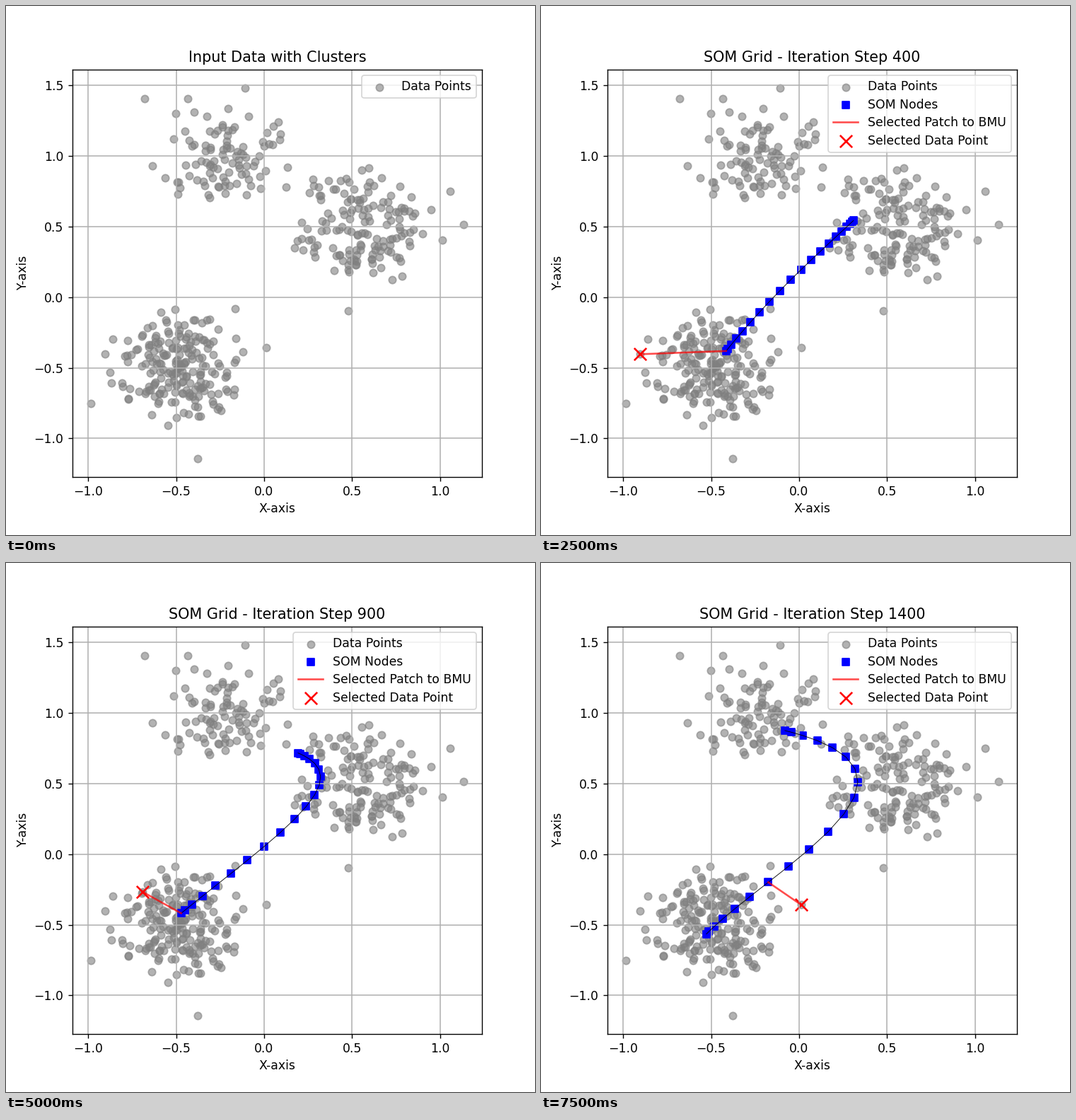
A matplotlib script that plays this animation: 748 by 748 pixels, repeating every 8000 ms.

```python
import numpy as np
import matplotlib.pyplot as plt
from matplotlib.animation import FuncAnimation

NODES = 20


def to_data(points):
    """Convert stage pixels (y down) to axis coordinates."""
    return (np.asarray(points, float) - (365, 411.8)) / (249, -199.7)


# Sample picked at each training step
PICKS = to_data([
    (288, 443.5), (267, 542.5), (320, 175), (269, 490.5), (139.5, 492.5),
    (563, 290), (335, 199), (272, 552), (300, 505), (193, 465),
    (288, 535.5), (216.5, 548.5), (232, 517), (229, 593), (368, 483.5)])

OUTLIERS = to_data([
    (196, 131), (257, 131), (338, 116), (385, 164), (628, 262),
    (647, 309), (484, 431), (324, 428), (120, 562), (271, 640)])

# Four key nodes of the chain at some steps
KEYS = np.array([2, 7, 12, 17])
CHAINS = {
    200: [(288, 463), (322, 406), (358, 331), (379, 275)],
    400: [(269, 479), (323, 418), (395, 347), (437, 308)],
    700: [(258, 494), (330, 433), (406, 336), (405, 281)],
    900: [(263, 483), (365, 401), (443, 314), (422, 273)],
    1200: [(242, 515), (347, 431), (443, 318), (378, 257)],
    1400: [(245, 514), (350, 429), (448, 310), (370, 244)],
}

rng = np.random.default_rng(7)


def cluster(n, center, spread, reach=2.3):
    """Normal cloud cut off at `reach` deviations."""
    u = rng.random(n) * (1 - np.exp(-reach ** 2 / 2))
    r, a = np.sqrt(-2 * np.log(1 - u)), rng.random(n) * 2 * np.pi
    offset = np.column_stack([r * np.cos(a), r * np.sin(a)])
    return to_data(center + offset * spread)


data = np.vstack([
    OUTLIERS, PICKS,
    cluster(188, (240, 510), (44, 38)),
    cluster(146, (503, 311), (51, 40)),
    cluster(92, (311, 214), (49, 37))])


def waves(nodes):
    """Cosines that flatten at both ends, as a trained chain does."""
    return np.cos(np.outer(nodes + 0.5, np.arange(len(KEYS))) * np.pi / NODES)


def full_chain(points):
    return waves(np.arange(NODES)) @ np.linalg.solve(waves(KEYS), to_data(points))


chains = [full_chain(p) for p in CHAINS.values()]

# Training starts from a random tangle that first shrinks to a short chain
tangle = rng.random((NODES, 2))
tangle *= 0.867 / tangle[:, 0].max()
short = chains[0].mean(axis=0) + 0.6 * (chains[0] - chains[0].mean(axis=0))
steps = [0, 100, *CHAINS]
shapes = np.array([tangle, short, *chains])


def nodes_at(step):
    k = min(np.searchsorted(steps, step, side="right"), len(steps) - 1)
    f = (step - steps[k - 1]) / (steps[k] - steps[k - 1])
    return (1 - f) * shapes[k - 1] + f * shapes[k]


fig, ax = plt.subplots(figsize=(6, 6), dpi=748 / 6)


def draw_training(step, pick):
    nodes = nodes_at(step)
    best = nodes[np.argmin(((nodes - pick) ** 2).sum(axis=1))]
    ax.scatter(*nodes.T, color="blue", marker="s", label="SOM Nodes")
    ax.plot(*nodes.T, color="black", lw=0.5)
    ax.plot(*zip(pick, best), color="red", alpha=0.7,
            label="Selected Patch to BMU")
    ax.scatter(*pick, color="red", marker="x", s=100,
               label="Selected Data Point")
    ax.set_title(f"SOM Grid - Iteration Step {step}")


def draw(i):
    ax.clear()
    ax.scatter(*data.T, color="gray", alpha=0.6, label="Data Points")
    if i == 0:
        ax.set_title("Input Data with Clusters")
    else:
        draw_training((i - 1) * 100, PICKS[i - 1])
    ax.set(xlim=(-1.0904, 1.2378), ylim=(-1.272, 1.612))
    ax.set_xlabel("X-axis", labelpad=3.3)
    ax.set_ylabel("Y-axis")
    ax.grid(True, linewidth=0.9)
    ax.legend(loc="upper right", labelspacing=0.43)


anim = FuncAnimation(fig, draw, frames=16, interval=500, repeat=True)
plt.show()
```
